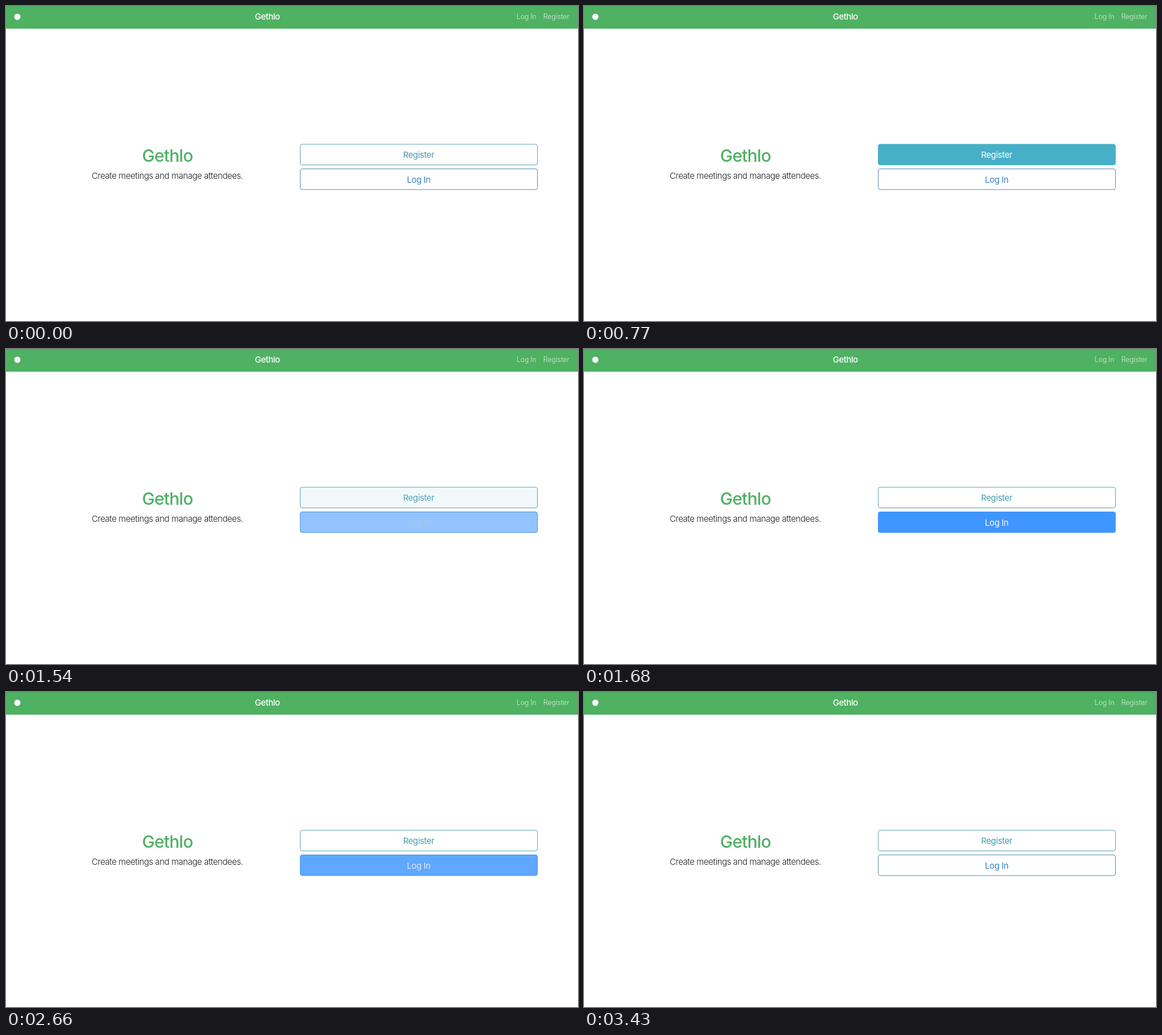
Recreate the animation shown at these times as an HTML page. Size 1008 by 556 pixels, loop 3500 ms.

```html
<!DOCTYPE html>
<html lang="en">
<head>
<meta charset="utf-8">
<title>Meetings</title>
<style>
  html, body { margin: 0; width: 100%; height: 100%; overflow: hidden; background: #fff; }
  svg { display: block; width: 1008px; height: 556px; }
  text { font-family: Inter, Roboto, sans-serif; font-size: 15px; letter-spacing: -.025em; }
  .mid { text-anchor: middle; }
  .brand { fill: #fff; font-weight: 500; letter-spacing: -.031em; }
  .link { fill: #b5dfbd; font-size: 12.5px; }
  .title { fill: #4fb064; font-size: 30px; font-weight: 500; }
  .lead { fill: #1c1f22; font-weight: 350; letter-spacing: -.028em; }
</style>
</head>
<body>
<svg viewBox="0 0 1008 556">
  <rect width="1008" height="40" fill="#4fb162"/>
  <rect width="1008" height="1" fill="#47a25a"/>
  <circle cx="20" cy="19" r="5.5" fill="#fff"/>
  <text class="brand mid" x="460.5" y="23.5">Gethlo</text>
  <text class="link" x="899.8" y="22.6">Log In</text>
  <text class="link" x="946.8" y="22.6">Register</text>
  <text class="title mid" x="284.5" y="275">Gethlo</text>
  <text class="lead mid" x="284.3" y="305">Create meetings and manage attendees.</text>
  <g id="register">
    <rect x="518.5" y="244" width="418" height="36.5" rx="3.5"/>
    <text class="mid" x="727.2" y="268">Register</text>
  </g>
  <g id="login">
    <rect x="518.5" y="287.5" width="418" height="36.5" rx="3.5"/>
    <text class="mid" x="727.2" y="311.6">Log In</text>
  </g>
</svg>
<script>
  const LOOP = 3500;
  const WHITE = [255, 255, 255];

  const mix = (from, to, k) =>
    `rgb(${from.map((v, i) => Math.round(v + (to[i] - v) * k)).join(',')})`;

  // Each step is [start time in ms, hover amount], held until the next one.
  function hover(id, { ink, line, fill, steps }) {
    const play = (selector, property, from, to) => {
      const frames = [...steps, [LOOP, 0]].map(([time, k]) => ({
        offset: time / LOOP,
        [property]: mix(from, to, k),
        easing: 'steps(1, end)'
      }));
      document.querySelector(`#${id} ${selector}`)
        .animate(frames, { duration: LOOP, iterations: Infinity });
    };
    play('rect', 'fill', WHITE, fill);
    play('rect', 'stroke', line, fill);
    play('text', 'fill', ink, WHITE);
  }

  hover('register', {
    ink: [70, 157, 177], line: [92, 162, 175], fill: [71, 176, 200],
    steps: [[0, 0], [560, .16], [630, .93], [700, 1], [1470, .84], [1540, .07], [1610, 0]]
  });
  hover('login', {
    ink: [56, 126, 196], line: [84, 136, 176], fill: [64, 150, 255],
    steps: [[0, 0], [1540, .56], [1610, 1], [2660, .84], [2730, .07], [2800, 0]]
  });
</script>
</body>
</html>
```
